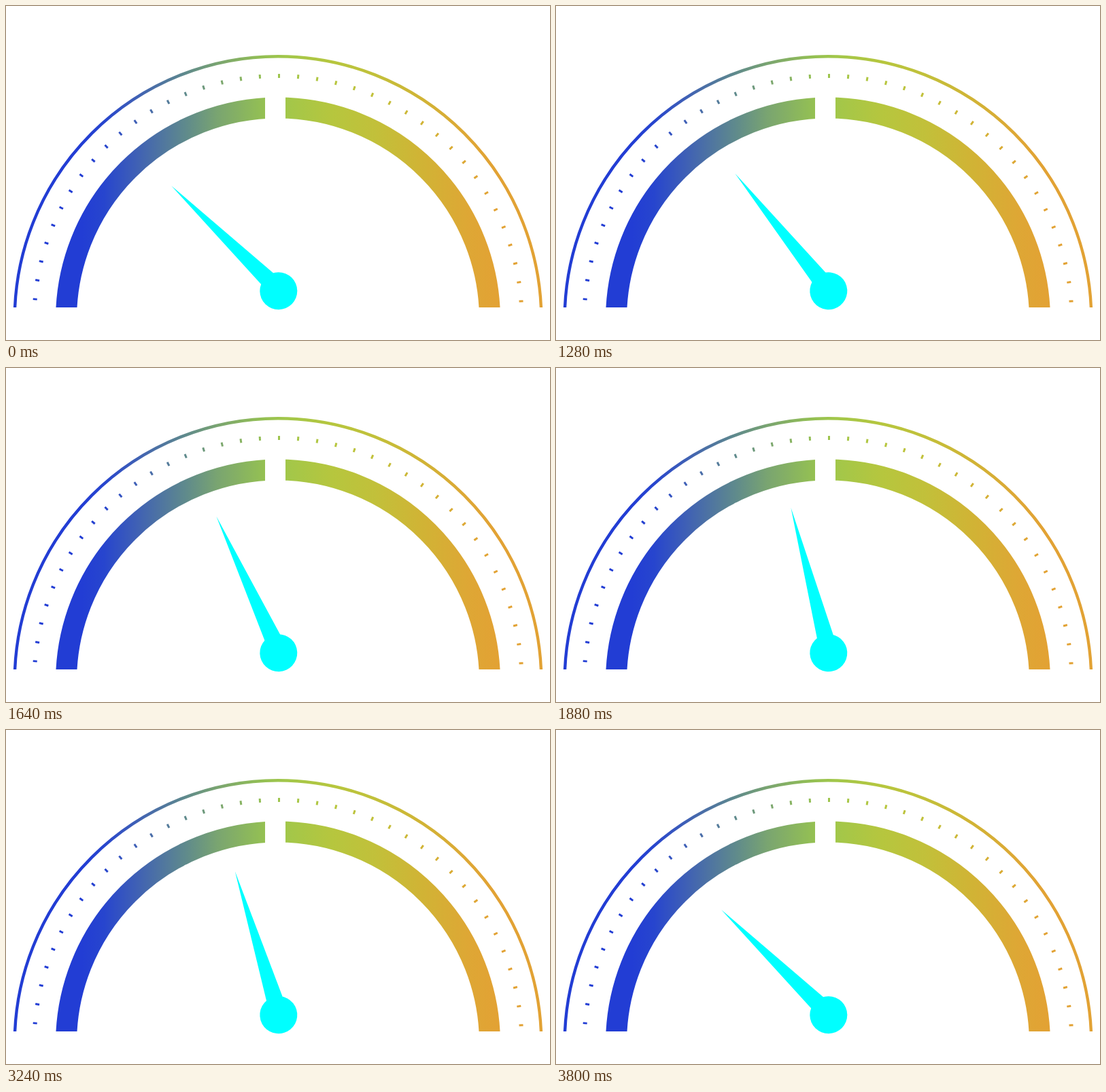
An HTML page for the animation above (3840 ms loop, 800 px wide and 492 px high).

```html
<!DOCTYPE html>
<html lang="en">
<head>
<meta charset="utf-8">
<title>Gauge</title>
<style>
  html, body { margin: 0; width: 100%; height: 100%; overflow: hidden; background: #fff; }
  svg { display: block; width: 100%; height: 100%; }
</style>
</head>
<body>
<svg viewBox="0 0 800 492">
  <defs>
    <linearGradient id="scale" gradientUnits="userSpaceOnUse" x1="0" y1="0" x2="800" y2="0">
      <stop offset=".14" stop-color="#223dd4"/>
      <stop offset=".18" stop-color="#2745ce"/>
      <stop offset=".24" stop-color="#3f60b5"/>
      <stop offset=".33" stop-color="#5f8a8c"/>
      <stop offset=".39" stop-color="#7aa570"/>
      <stop offset=".47" stop-color="#93bf54"/>
      <stop offset=".515" stop-color="#a2c74a"/>
      <stop offset=".6" stop-color="#b6c63e"/>
      <stop offset=".68" stop-color="#c2c03a"/>
      <stop offset=".76" stop-color="#d0b435"/>
      <stop offset=".85" stop-color="#dea735"/>
      <stop offset=".9" stop-color="#e2a234"/>
    </linearGradient>
    <clipPath id="upper"><path d="M0 0H800V444H0Z"/></clipPath>
  </defs>
  <g fill="none" stroke="url(#scale)" clip-path="url(#upper)">
    <circle cx="400" cy="461.5" r="387.3" stroke-width="4.4"/>
    <circle cx="400" cy="461.5" r="311.5" stroke-width="31"/>
    <path id="ticks" stroke-width="3"/>
  </g>
  <path d="M381 130H411V170H381Z" fill="#fff"/>
  <g id="needle" fill="#0ff">
    <path d="M0-221L15 0H-12.4Z"/>
    <circle r="27.5"/>
  </g>
</svg>
<script>
const LOOP = 3840, STEP = 40, TRAVEL = 960;
const LOW = -45.5, HIGH = -14.5;
const ticks = document.getElementById('ticks');
const needle = document.getElementById('needle');

let d = '';
for (let k = -19; k <= 19; k++) {
  const a = (0.24 + 4.5 * k) * Math.PI / 180;
  const at = r => `${400 + r * Math.sin(a)} ${461.5 - r * Math.cos(a)}`;
  d += `M${at(355.5)}L${at(361.5)}`;
}
ticks.setAttribute('d', d);

// Cubic Bézier easing with y1 = 0, solved for x by bisection
function ease(x, x1, x2, y2) {
  if (x <= 0) return 0;
  if (x >= 1) return 1;
  const curve = (s, a, b) => 3 * (1 - s) ** 2 * s * a + 3 * (1 - s) * s * s * b + s ** 3;
  let lo = 0, hi = 1;
  for (let i = 0; i < 30; i++) {
    const mid = (lo + hi) / 2;
    if (curve(mid, x1, x2) < x) lo = mid; else hi = mid;
  }
  return curve(lo, 0, y2);
}

function angleAt(t) {
  const rise = ease((t - 920) / TRAVEL, 0.333, 0.833, 0.833);
  const fall = ease((t - 2840) / TRAVEL, 0.93, 0.833, 0.833);
  return LOW + (HIGH - LOW) * (rise - fall);
}

function draw(now) {
  const t = Math.floor(now % LOOP / STEP) * STEP;
  needle.setAttribute('transform', `translate(400.8 419.7) rotate(${angleAt(t)})`);
}

const start = performance.now();
function tick() {
  draw(performance.now() - start);
  requestAnimationFrame(tick);
}
tick();
</script>
</body>
</html>
```
